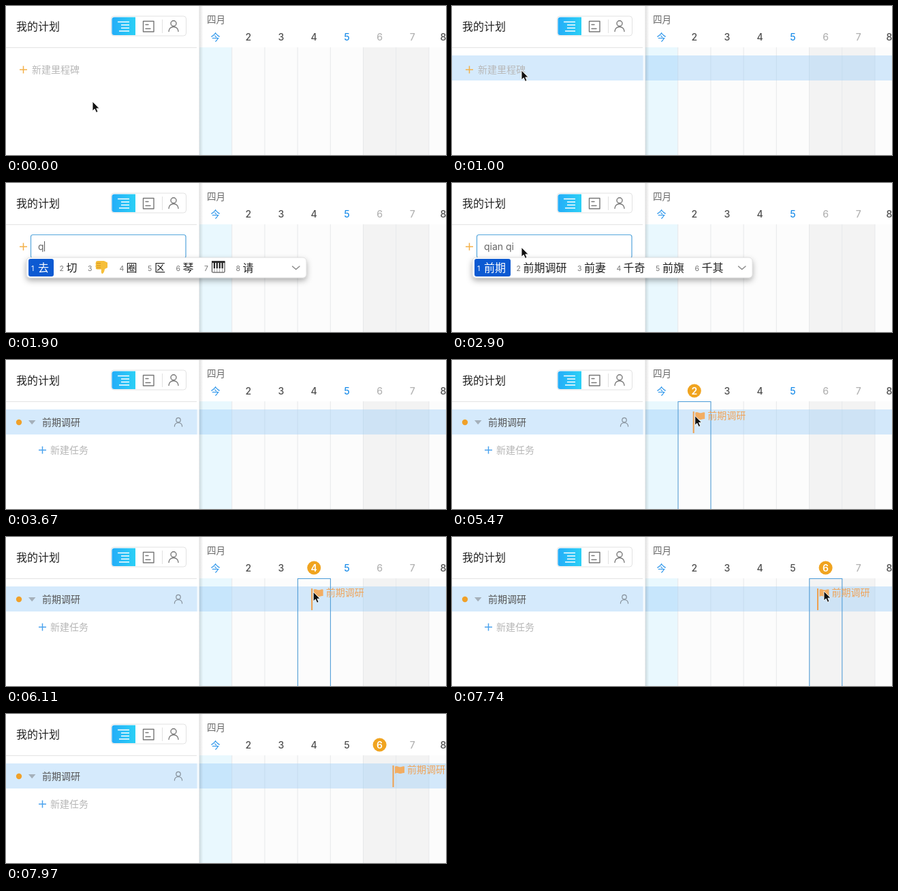
Animation, 646 px wide and 220 px high, one loop 8000 ms. Source, as an HTML page:

```html
<!DOCTYPE html>
<html lang="zh-CN">
<head>
<meta charset="utf-8">
<style>
html, body { margin: 0; width: 100%; height: 100%; overflow: hidden; background: #fff; }
svg { display: block; width: 646px; height: 220px; }
text { font-family: Inter, "Noto Sans CJK SC", "Noto Sans CJK", "Noto Sans CJK JP", sans-serif; font-size: 14px; white-space: pre; }
.line { fill: none; stroke-linecap: round; stroke-linejoin: round; }
</style>
</head>
<body>
<svg viewBox="0 0 646 220">
  <defs>
    <linearGradient id="tab"><stop stop-color="#24adf8"/><stop offset="1" stop-color="#2bd0f6"/></linearGradient>
    <linearGradient id="edge"><stop stop-color="#000" stop-opacity=".13"/><stop offset="1" stop-color="#000" stop-opacity="0"/></linearGradient>
    <linearGradient id="dock"><stop stop-color="#bbb" stop-opacity="0"/><stop offset=".08" stop-color="#bbb"/><stop offset=".92" stop-color="#bbb"/><stop offset="1" stop-color="#bbb" stop-opacity="0"/></linearGradient>
    <filter id="shade" x="-10%" y="-60%" width="120%" height="260%"><feDropShadow dx="0" dy="4" stdDeviation="4.5" flood-opacity=".32"/></filter>
    <g id="person" class="line"><circle cy="-4.2" r="4"/><path d="M-7 7.6C-7-1.5 7-1.5 7 7.6"/></g>
  </defs>

  <rect width="646" height="220" fill="#fff"/>
  <g id="grid"></g>
  <rect id="hover" y="73" width="646" height="37" fill="#8cc4f7" fill-opacity=".36"/>
  <rect id="column" y="61.5" width="48" height="170" fill="none" stroke="#4a9bd8"/>
  <g id="dates"></g>
  <text x="295" y="24.5" font-size="13.5" style="font-size:13.5px" fill="#666">四月</text>
  <g id="flag">
    <path d="M0 76V108" stroke="#efa04f" stroke-width="2"/>
    <path d="M2.5 77.5C6 75.5 9 79.5 12 78Q14.5 76.800 16.500 77.500V87C13 86.500 11.500 89 8.500 87.700Q5.500 86.300 2.500 88Z" fill="#f2ad63"/>
    <text x="20.500" y="87" fill="#efa45a" font-weight="500">前期调研</text>
  </g>

  <rect x="280.500" width="3.500" height="220" fill="#fff" fill-opacity=".75"/>
  <rect x="283.500" width="6" height="220" fill="url(#edge)"/>
  <path d="M0 61.500H280" stroke="#e4e4e4"/>
  <text x="15" y="35.500" fill="#222" font-weight="500" style="font-size:16px">我的计划</text>

  <rect x="154.500" y="15" width="110" height="29" rx="4" fill="#fff" stroke="#e2e2e2"/>
  <path d="M190 16.500V43H159Q155.500 43 155.500 39.500V20Q155.500 16.500 159 16.500Z" fill="url(#tab)"/>
  <path d="M164 23.500H181M169 28H181M169 32.500H181M166 37H181" stroke="#fff" stroke-width="1.400"/>
  <g class="line" stroke="#777" stroke-width="1.400">
    <rect x="201.500" y="22.500" width="15.500" height="15.500"/>
    <path d="M205 27.500H209M205 33.500H212"/>
    <use href="#person" x="246" y="30"/>
  </g>
  <path d="M229.500 20V40" stroke="#e2e2e2"/>

  <path id="plus" d="M20 94H31M25.500 88.500V99.500" stroke="#f3b14a" stroke-width="1.500"/>
  <text id="hint" x="38" y="99" fill="#b8b8b8">新建里程碑</text>

  <g id="task">
    <circle cx="19" cy="92" r="4.200" fill="#f0a12a"/>
    <path d="M33 89H43.500L38.200 95.200Z" fill="#a5b0ba"/>
    <text x="53" y="97" fill="#555">前期调研</text>
    <use href="#person" stroke="#858f99" stroke-width="1.500" transform="translate(253 92) scale(.8)"/>
    <path d="M48 133H59M53.500 127.500V138.500" stroke="#4ba3ee" stroke-width="1.500"/>
    <text x="65" y="138" fill="#b6b6b6">新建任务</text>
  </g>

  <g id="field">
    <rect x="36.500" y="76.500" width="227.500" height="34.500" rx="3" fill="#fff" stroke="#55a6dc" stroke-width="1.200"/>
    <text id="typed" x="47" y="99" fill="#666"></text>
    <path id="caret" d="M0 86V101" stroke="#555"/>
  </g>

  <g id="popup">
    <rect x="30" y="110" width="411" height="30" rx="5" fill="#fff" stroke="#c9c9c9" stroke-width=".6" filter="url(#shade)"/>
    <path d="M420.500 123L425.700 127.500L431 123" class="line" stroke="#888" stroke-width="1.400"/>
    <g id="words"></g>
  </g>

  <path d="M180 219H474" stroke="url(#dock)" stroke-width="2.500" opacity=".8"/>
  <path id="mouse" d="M0 0V14L3.200 11.100L5.500 16.300L8 15.200L5.800 10.200H10Z" fill="#111" stroke="#fff" stroke-width=".9"/>
</svg>
<script>
const $ = id => document.getElementById(id);
const LOOP = 8000, X0 = 283.5, PITCH = 48.2;
const ENTER_ROW = 580, OPEN = 1100, COMMIT = 2950, SAVE = 3470, DROP = 7800;

// [time, typed text, candidates]; "!" and "#" stand for the two pictograms
const keys = [
  [1740, "q", "去 切 ! 圈 区 琴 # 请"],
  [2000, "qi", "起 其 气 七 期 奇 齐 骑"],
  [2130, "qia", "恰 卡 掐 洽 髂 葜 袷 恰恰"],
  [2260, "qian", "前 钱 千 签 浅 欠 牵 潜"],
  [2400, "qian q", "前期 欠钱 前妻 前去 千秋 前前"],
  [2570, "qian qi", "前期 前期调研 前妻 千奇 前旗 千其"]
];
const mousePath = [[70, 127, 141], [830, 102, 95], [4400, 102, 95], [4800, 189, 88],
  [5170, 304, 83], [6010, 451, 81], [6110, 451, 81], [6780, 546, 80]];
const flagPath = [[5100, 282], [5170, 302], [6010, 449], [6110, 449], [6780, 537], [7750, 537], [7970, 568.5]];

function along(path, t, i) {
  const n = path.findIndex(p => p[0] > t);
  if (n < 0) return path[path.length - 1][i];
  if (n === 0) return path[0][i];
  const a = path[n - 1], b = path[n];
  return a[i] + (b[i] - a[i]) * (t - a[0]) / (b[0] - a[0]);
}
const clamp = v => Math.max(0, Math.min(1, v));
const show = (id, on) => $(id).setAttribute("display", on ? "inline" : "none");

function buildGrid() {
  let cells = "", labels = "";
  for (let i = 0; i < 8; i++) {
    const x = X0 + i * PITCH, weekend = i === 5 || i === 6;
    const fill = i === 0 ? "#e9f8fe" : weekend ? "#f3f3f3" : "#fcfcfc";
    cells += `<rect x="${x}" y="61" width="${PITCH}" height="159" fill="${fill}"/>`;
    if (i) cells += `<path d="M${x} 61V220" stroke="#e6e8ea"/>`;
    const mid = i === 7 ? 642 : x + PITCH / 2;
    labels += `<circle cx="${mid}" cy="45.500" r="10" fill="#f0a420"/>` +
      `<text x="${mid}" y="50.500" text-anchor="middle" font-weight="500">${i ? i + 1 : "今"}</text>`;
  }
  $("grid").innerHTML = cells;
  $("dates").innerHTML = labels;
}

function thumb(x) {
  return `<path transform="translate(${x} 115)" d="M1 2Q1 0 4 0H13L18 2.500V10L14 12Q13 18 10.500 19Q8 19 9 12.500H3Q0 12 1 9.500Q-.5 8 1 6Q0 4 1 2Z" fill="#f6bf3a"/>` +
    `<path d="M${x + 2} 118.500h6m-6 3.500h6m-6 3h6" stroke="#d08f20" stroke-width=".9"/>`;
}
function piano(x) {
  let s = `<rect x="${x + .5}" y="115.500" width="18.500" height="16.500" rx="1" fill="#fff" stroke="#333"/>` +
    `<path d="M${x} 116.500h19.500" stroke="#333" stroke-width="3"/>`;
  for (let i = 1; i < 5; i++) {
    const k = x + i * 3.9;
    s += `<path d="M${k} 117V132" stroke="#666" stroke-width=".6"/><path d="M${k} 117V126" stroke="#222" stroke-width="2.200"/>`;
  }
  return s;
}

function wordList(list) {
  let x = 37, out = "";
  list.split(" ").forEach((w, i) => {
    const pic = w === "!" || w === "#", width = pic ? 21 : 16 * w.length;
    if (!i) out += `<rect x="33" y="112" width="${width + 21}" height="26" rx="3" fill="#0c5ad2"/>`;
    out += `<text x="${x}" y="129.500" fill="${i ? "#777" : "#fff"}" style="font-size:10.500px">${i + 1}</text>`;
    if (w === "!") out += thumb(x + 11);
    else if (w === "#") out += piano(x + 11);
    else out += `<text x="${x + 10}" y="130.500" fill="${i ? "#222" : "#fff"}" font-weight="${i ? 400 : 500}" style="font-size:16px">${w}</text>`;
    x += width + 25.5;
  });
  return out;
}

function drawDates(active, t) {
  const kids = $("dates").children;
  const passed = t > 6100 && active > 3;
  for (let i = 0; i < 8; i++) {
    const on = i === active;
    const blue = i === 0 || (i === 4 && !passed);
    kids[2 * i].setAttribute("opacity", on ? 1 : 0);
    kids[2 * i + 1].setAttribute("fill", on ? "#fff" : blue ? "#1f8fea" : i === 5 || i === 6 ? "#b4b4b4" : "#505050");
    kids[2 * i + 1].setAttribute("font-weight", on ? 600 : 500);
  }
}

let lastKey = null;
function render(t) {
  const mx = along(mousePath, t, 1), my = along(mousePath, t, 2);
  const key = keys.filter(k => k[0] <= t).pop();
  const editing = t >= OPEN && t < SAVE, saved = t >= SAVE;

  $("mouse").setAttribute("transform", `translate(${mx} ${my})`);
  show("mouse", t < 1740 || (t >= 2800 && t < COMMIT) || (t >= 4400 && t < DROP));

  const glow = t < OPEN ? clamp((t - ENTER_ROW) / 120) : editing ? 0 : clamp((t - SAVE) / 150);
  $("hover").setAttribute("opacity", glow);

  show("plus", !saved);
  show("hint", t < OPEN);
  show("task", saved);
  show("field", editing);

  const text = t >= COMMIT ? "前期调研" : key ? key[1] : "";
  if ($("typed").textContent !== text) $("typed").textContent = text;
  const end = text ? $("typed").getComputedTextLength() : 0;
  $("caret").setAttribute("transform", `translate(${48 + end} 0)`);
  show("caret", t < 2570 || (t >= COMMIT && t < 3170));

  show("popup", key && t < COMMIT);
  if (key && key !== lastKey) $("words").innerHTML = wordList(key[2]);
  lastKey = key;

  const active = mx > X0 ? Math.floor((mx - X0) / PITCH) : -1;
  drawDates(active, t);
  show("column", active >= 0 && t < DROP);
  $("column").setAttribute("x", X0 + active * PITCH + .3);
  show("flag", active >= 0);
  $("flag").setAttribute("transform", `translate(${along(flagPath, t, 1)} 0)`);
}

buildGrid();
function tick() {
  render(performance.now() % LOOP);
  requestAnimationFrame(tick);
}
tick();
</script>
</body>
</html>
```
